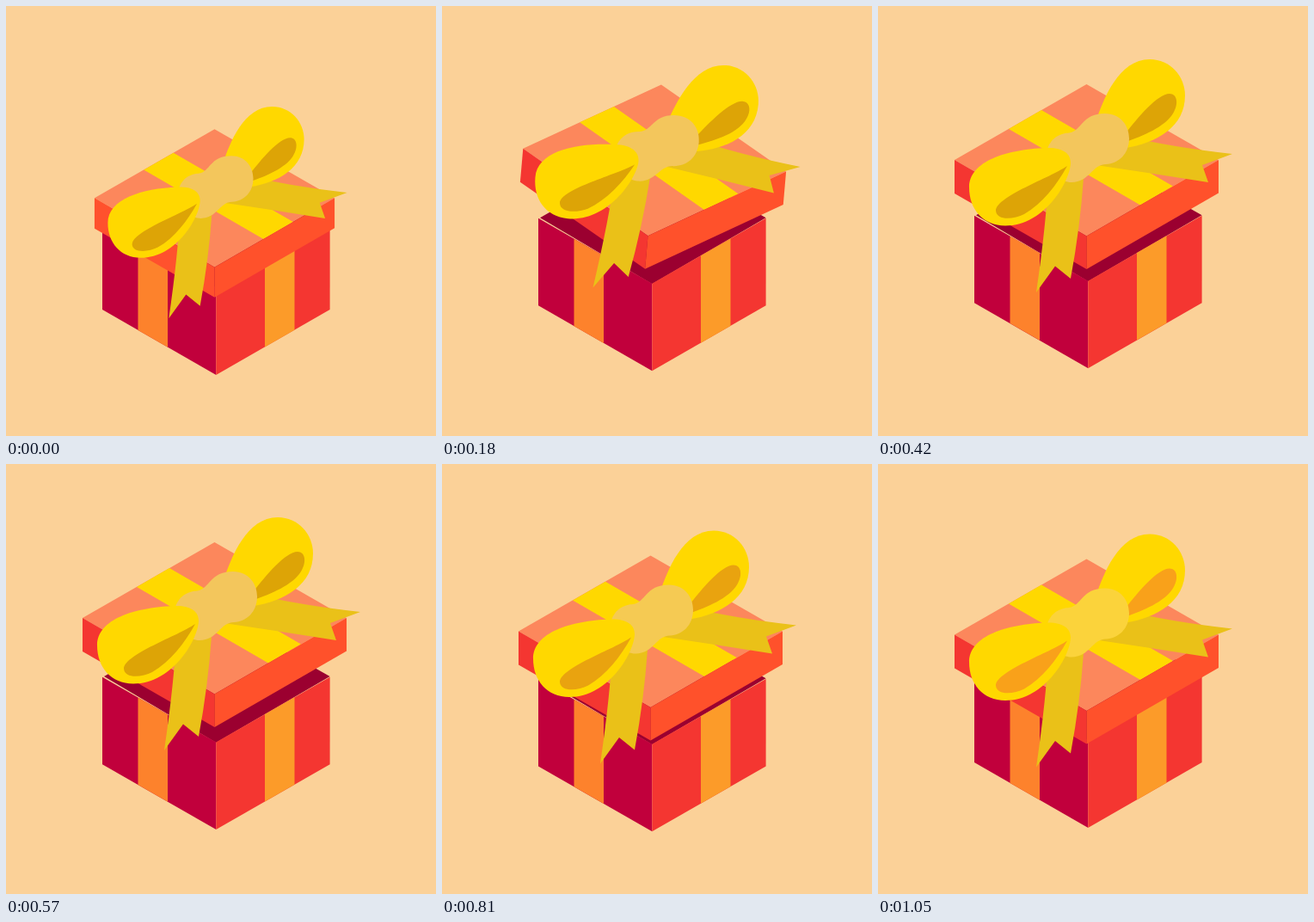
Animation of 500x500 px, one loop 1830 ms. Source, as an HTML page with a canvas:

```html
<!DOCTYPE html>
<html lang="en">
<head>
<meta charset="utf-8">
<title>Gift box</title>
<style>
  html, body { margin: 0; width: 100%; height: 100%; overflow: hidden; background: #fbd198; }
  canvas { display: block; width: 500px; height: 500px; }
</style>
</head>
<body>
<canvas id="stage" width="500" height="500"></canvas>
<script>
const ctx = document.getElementById('stage').getContext('2d');
const LOOP = 1830, STEP = 30, END = 1050;
const YELLOW = '#ffd800', TAIL = '#eac118', RED = '#f43631';

const shapes = {
  rightTail: 'M282 150Q340 164 412 172L377 185L384 205Q315 194 247 184Z',
  leftTail: 'M198 200Q196 250 184 333L206 302.5L224 317Q235 258 239 200Z',
  rightLoop: 'M253 135C262 108 280 62 316 62C340 62 357 82 357 104C357 140 325 159 288 165L260 162Z',
  rightFold: 'M288 148C302 130 325 102 339 102C348 102 350 114 343 125C333 141 308 151 288 158Z',
  knot: 'M197 166C202 152 213 148 222 147.5C237 146 236 125 264 125C282 125 292 139 292 154' +
    'C292 172 280 183 265 184C249 184 246 205 225 205C214 205 200 196 197 166Z',
  leftLoop: 'M106 211C106 180 150 167 195 165C214 164 224 171 224 182C224 202 195 255.5 148 255.5C122 255.5 106 236 106 211Z',
  leftFold: 'M220 186C200 200 138 221 137 238C138 250 158 248 170 242C191 230 208 208 220 186Z'
};
for (const name in shapes) shapes[name] = new Path2D(shapes[name]);

const lerp = (a, b, k) => a + (b - a) * k;
const ramp = (t, from, to) => Math.min(1, Math.max(0, (t - from) / (to - from)));
const blend = (a, b, k) => `rgb(${a.map((v, i) => Math.round(lerp(v, b[i], k))).join(',')})`;

// The box bobs up and down once, then rises slowly
const boxY = t => t < 720 ? -9.4 * (1 - Math.abs(t / 360 - 1)) : -6 * ramp(t, 720, END);

// The lid pops up, rocks once through ten degrees each way, and drops
const lidY = t => 42.5 * (1 - ramp(t, 0, 150)) + 19.5 * ramp(t, 570, 870);
const lidTurn = t => Math.asin(Math.sin(2 * Math.PI * ramp(t, 150, 390))) / 9;

function poly(color, ...pts) {
  ctx.fillStyle = color;
  ctx.beginPath();
  for (let i = 0; i < pts.length; i += 2) ctx.lineTo(pts[i], pts[i + 1]);
  ctx.closePath();
  ctx.fill();
}

function shape(name, color) {
  ctx.fillStyle = color;
  ctx.fill(shapes[name]);
}

// Vertical strip of a box wall between two x positions
function wall(color, x0, x1) {
  const top = x => 327.5 - Math.abs(x - 244.3) * 0.574;
  poly(color, x0, top(x0), x1, top(x1), x1, top(x1) + 101.5, x0, top(x0) + 101.5);
}

function drawBox(t) {
  ctx.save();
  ctx.translate(0, boxY(t));
  poly('#9b0030', 114, 251, 244.3, 176, 376.6, 251, 244.3, 328);
  wall('#c1003c', 112, 244.3);
  wall(RED, 244.3, 376.6);
  wall('#fd822c', 153.5, 188);
  wall('#fc9b29', 301, 335.5);
  ctx.restore();
}

function drawLid(t) {
  const pop = ramp(t, 0, 150), warm = ramp(t, 720, 930);
  const scale = lerp(1 / 1.1, 1, pop);
  const fold = blend([221, 164, 6], [249, 161, 26], warm);
  const knot = blend([243, 198, 92], [251, 211, 59], ramp(t, 720, END));
  const side = blend([255, 81, 45], [244, 54, 49], pop);

  ctx.save();
  ctx.translate(242.5, 233 + lidY(t));
  ctx.rotate(lidTurn(t));
  ctx.translate(0, -34.5);
  ctx.scale(scale, scale);
  ctx.translate(-242.5, -198.5);

  poly('#fc875c', 242.5, 91, 396, 179, 242.5, 267.5, 89, 179);
  poly(YELLOW, 152, 142.9, 190, 121.1, 343, 209.6, 305, 231.5);
  poly(side, 89, 179, 242.5, 267.5, 242.5, 306, 89, 218);
  poly('#ff512b', 396, 179, 242.5, 267.5, 242.5, 306, 396, 217.5);

  shape('rightTail', TAIL);
  shape('leftTail', TAIL);
  shape('rightLoop', YELLOW);
  shape('rightFold', fold);
  shape('knot', knot);
  shape('leftLoop', YELLOW);
  shape('leftFold', fold);
  ctx.restore();
}

function draw(t) {
  ctx.fillStyle = '#fbd198';
  ctx.fillRect(0, 0, 500, 500);
  drawBox(t);
  drawLid(t);
}

let start = null;
function tick(now) {
  if (start === null) start = now;
  const t = (now - start) % LOOP;
  draw(Math.min(END, Math.floor(t / STEP) * STEP));
  requestAnimationFrame(tick);
}
draw(0);
requestAnimationFrame(tick);
</script>
</body>
</html>
```
